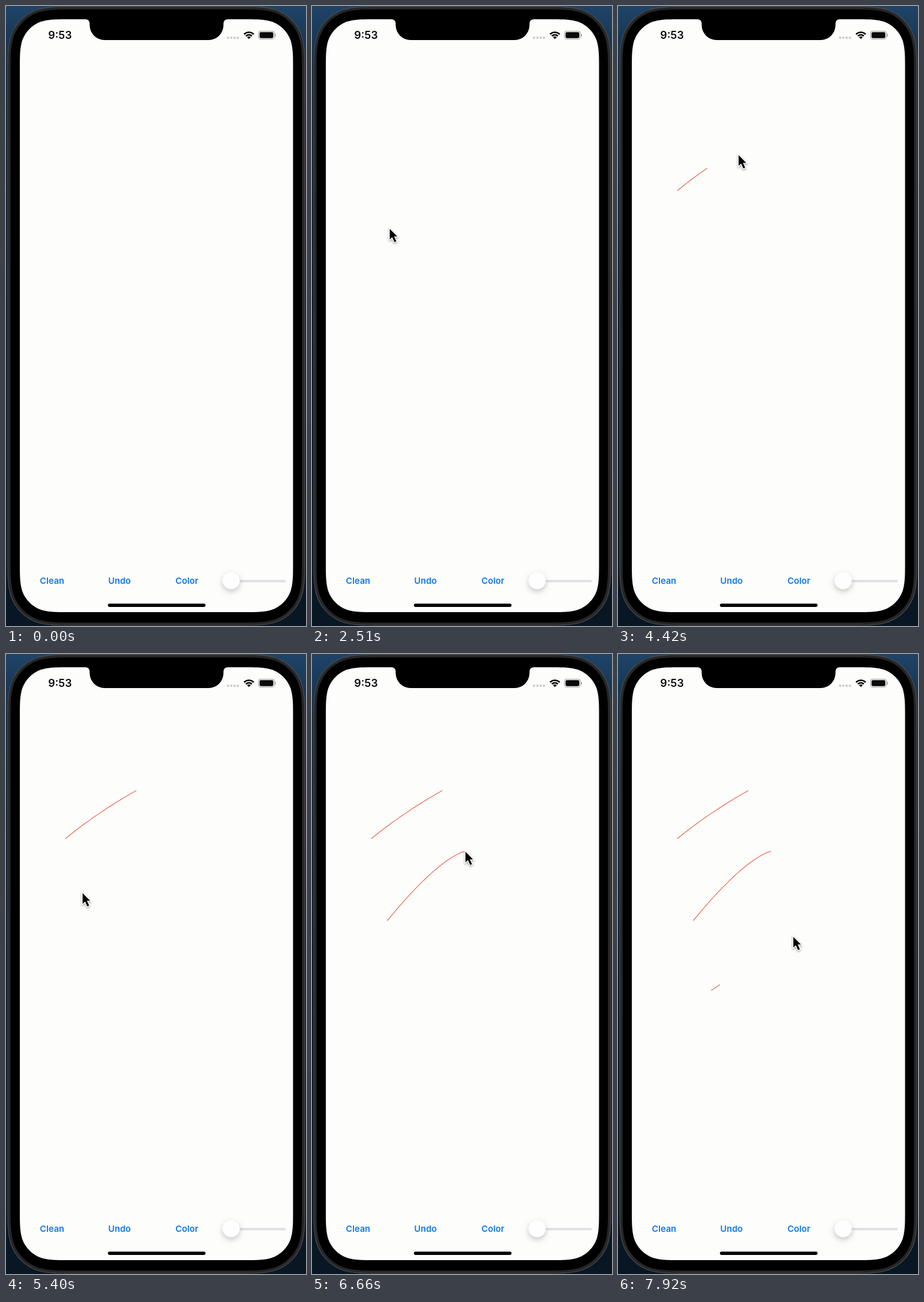
Animation of 521 by 1074 pixels, one loop 8000 ms. Source, as an HTML page with a canvas:

```html
<!DOCTYPE html>
<html lang="en">
<head>
<meta charset="utf-8">
<title>Drawing pad</title>
<style>
html, body { margin: 0; width: 100%; height: 100%; overflow: hidden; background: #000; }
canvas { display: block; width: 521px; height: 1074px; }
</style>
</head>
<body>
<canvas id="stage"></canvas>
<script>
const W = 521, H = 1074, LOOP = 8000, LAST = 7920;
const INK_LAG = 68;
const DARK = '#0a0a0a', BLUE = '#0f77ea', GREY = '#a2a2a3';
const canvas = document.getElementById('stage');
const ctx = canvas.getContext('2d');
const dpr = window.devicePixelRatio || 1;
canvas.width = W * dpr;
canvas.height = H * dpr;

// Each move bends from the end of the one before; those with ink also draw.
const entry = [530, 850];
const moves = [
  { at: 1107, time: 1343, to: [135, 386] },
  { at: 2600, time: 500, to: [103.7, 321] },
  { at: 4280, time: 280, to: [227, 237.5], bend: [200, 280], ink: [157, 277] },
  { at: 5080, time: 504, to: [131.2, 463], bend: [115, 395] },
  { at: 5960, time: 500, to: [266.5, 342.5], bend: [219, 357], ink: [219, 357] },
  { at: 6780, time: 520, to: [162.5, 584] },
  { at: 7848, time: 72, to: [304.5, 490], ink: [233, 536] }
];
moves.forEach((m, i) => {
  m.from = i ? moves[i - 1].to : entry;
  m.bend ??= m.from.map((v, k) => (v + m.to[k]) / 2);
});

function quad(a, b, c, u) {
  const v = 1 - u;
  return a.map((p, k) => v * v * p + 2 * u * v * b[k] + u * u * c[k]);
}

// Strokes start fast and slow down; glides ease at both ends.
function progress(m, t) {
  const k = Math.min(1, Math.max(0, (t - m.at) / m.time));
  return m.ink ? k * (2 - k) : k * k * (3 - 2 * k);
}

function box(x, y, w, h, r, fill) {
  ctx.beginPath();
  ctx.roundRect(x, y, w, h, r);
  ctx.fillStyle = fill;
  ctx.fill();
}

function disc(x, y, r, fill) {
  ctx.beginPath();
  ctx.arc(x, y, r, 0, Math.PI * 2);
  ctx.fillStyle = fill;
  ctx.fill();
}

// Rounded box whose corners curve in gradually
function softBox(x, y, w, h, r, fill) {
  const a = 1.5287 * r, b = 1.0885 * r, c = 0.8684 * r;
  const d = 0.6315 * r, e = 0.0749 * r, f = 0.3728 * r, g = 0.1691 * r;
  ctx.save();
  ctx.translate(x + w / 2, y + h / 2);
  ctx.beginPath();
  for (let i = 0; i < 4; i++) {
    const L = -(i % 2 ? h : w) / 2, T = -(i % 2 ? w : h) / 2;
    ctx.lineTo(L, T + a);
    ctx.bezierCurveTo(L, T + b, L, T + c, L + e, T + d);
    ctx.bezierCurveTo(L + g, T + f, L + f, T + g, L + d, T + e);
    ctx.bezierCurveTo(L + c, T, L + b, T, L + a, T);
    ctx.rotate(Math.PI / 2);
  }
  ctx.closePath();
  ctx.fillStyle = fill;
  ctx.fill();
  ctx.restore();
}

function label(text, x, y, size, color) {
  ctx.font = `600 ${size}px Inter, "Open Sans", sans-serif`;
  ctx.textAlign = 'center';
  ctx.fillStyle = color;
  ctx.fillText(text, x, y);
}

function shadow(color, blur, y) {
  ctx.shadowColor = color;
  ctx.shadowBlur = blur * dpr;
  ctx.shadowOffsetY = y * dpr;
}

function drawPhone() {
  const back = ctx.createLinearGradient(0, 0, 0, H);
  back.addColorStop(0, '#1f4468');
  back.addColorStop(0.1, '#142d46');
  back.addColorStop(0.5, '#0b1a28');
  back.addColorStop(1, '#081723');
  ctx.fillStyle = back;
  ctx.fillRect(0, 0, W, H);

  softBox(2.5, 0.5, 517, 1073, 79, '#4c4d4e');
  softBox(3.7, 1.7, 514.6, 1070.6, 78, '#272728');
  softBox(8, 6, 506, 1062, 74, '#000');
  softBox(24, 23, 474.5, 1027, 57.6, '#fdfdfc');
}

function drawNotch() {
  ctx.beginPath();
  ctx.moveTo(138, 22);
  ctx.lineTo(138, 23);
  ctx.arcTo(145.3, 23, 145.3, 33, 7);
  ctx.arcTo(145.3, 59, 200, 59, 26);
  ctx.arcTo(377.7, 59, 377.7, 33, 26);
  ctx.arcTo(377.7, 23, 385, 23, 7);
  ctx.lineTo(385, 22);
  ctx.fillStyle = '#000';
  ctx.fill();
}

function drawStatus() {
  label('9:53', 93.8, 57, 18.6, DARK);
  for (let i = 0; i < 4; i++) disc(385.7 + i * 5.7, 55, 2.1, '#c9c9ca');

  ctx.strokeStyle = DARK;
  ctx.lineCap = 'butt';
  for (const [r, width] of [[2.3, 4.6], [7.4, 2.7], [11.8, 2.7]]) {
    ctx.beginPath();
    ctx.arc(421.8, 57.3, r, -Math.PI * 0.75, -Math.PI * 0.25);
    ctx.lineWidth = width;
    ctx.stroke();
  }

  box(438, 43, 28.5, 15, 4.4, GREY);
  box(439.1, 44.1, 26.3, 12.8, 3.5, '#fdfdfc');
  box(440.3, 45.3, 23.9, 10.4, 2.4, DARK);
  box(467, 48, 1.6, 5, 1, GREY);
}

function drawControls() {
  ['Clean', 'Undo', 'Color'].forEach((text, i) =>
    label(text, 80 + i * 117.1, 1001, 15.2, BLUE));

  box(378, 994.2, 108, 4, 2, '#e0e0e4');
  ctx.save();
  shadow('rgba(0,0,0,0.22)', 10, 4);
  disc(391, 995.5, 15, '#fefefe');
  ctx.restore();
  box(177, 1035.3, 169.5, 5.6, 2.8, '#000');
}

function drawInk(t) {
  ctx.strokeStyle = '#e5654f';
  ctx.lineWidth = 1.2;
  ctx.lineJoin = 'round';
  for (const m of moves) {
    const end = progress(m, t - INK_LAG);
    if (!m.ink || !end) continue;
    ctx.beginPath();
    for (let i = 0; i <= 16; i++) {
      const [x, y] = quad(m.from, m.ink, m.to, end * i / 16);
      ctx.lineTo(x - 0.7, y - 1);
    }
    ctx.stroke();
  }
}

function drawPointer(t) {
  const m = moves.findLast(move => move.at <= t);
  if (!m) return;
  ctx.save();
  ctx.translate(...quad(m.from, m.bend, m.to, progress(m, t)));
  const arrow = new Path2D('M0 0V18.5L4.3 14.6L8.2 23L11.4 21.6L7.6 13.3H13.2Z');
  ctx.lineJoin = 'miter';
  ctx.strokeStyle = '#fff';
  ctx.lineWidth = 2.8;
  shadow('rgba(0,0,0,0.4)', 3.5, 1.5);
  ctx.stroke(arrow);
  shadow('transparent', 0, 0);
  ctx.fillStyle = '#000';
  ctx.fill(arrow);
  ctx.restore();
}

function frame(now) {
  const t = Math.min(now % LOOP, LAST);
  ctx.setTransform(dpr, 0, 0, dpr, 0, 0);
  drawPhone();
  drawNotch();
  drawStatus();
  drawControls();
  drawInk(t);
  drawPointer(t);
  requestAnimationFrame(frame);
}
requestAnimationFrame(frame);
</script>
</body>
</html>
```
